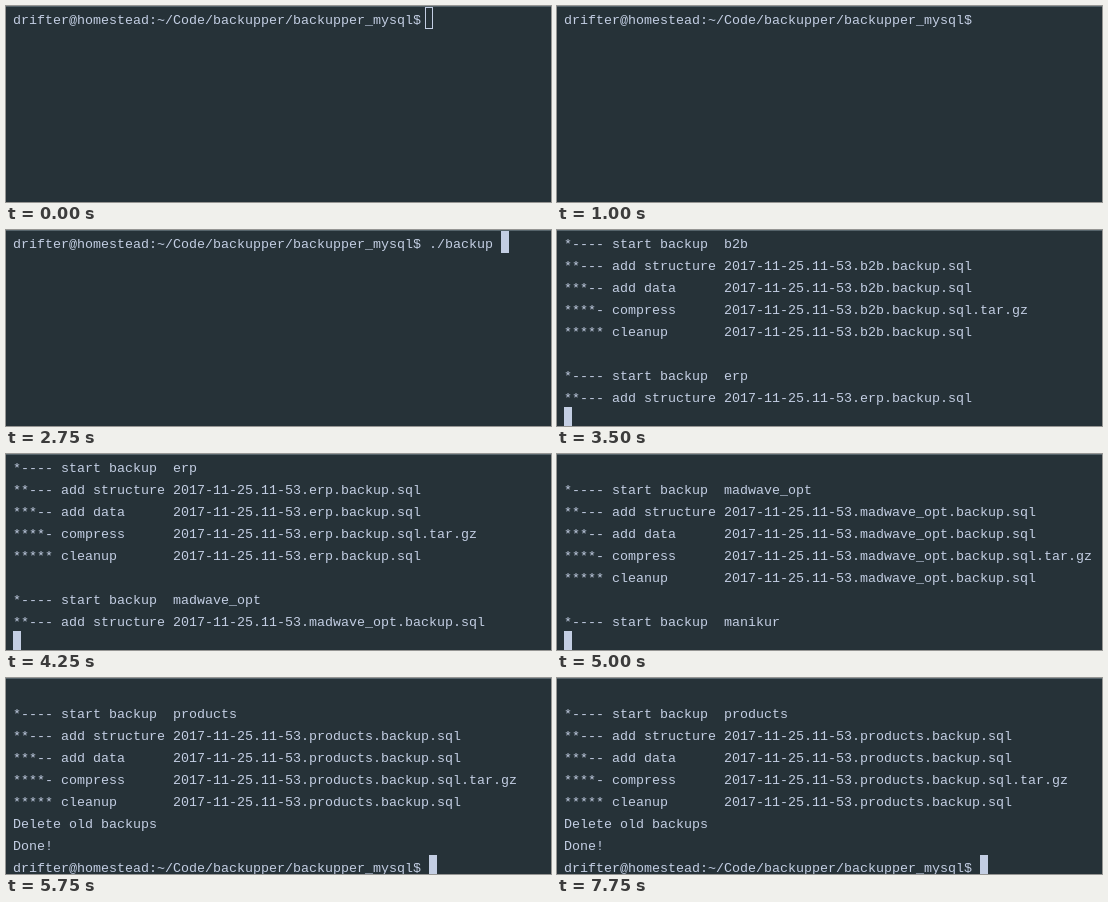
An HTML page that plays this animation: 545x196 px, repeating every 8000 ms.

```html
<!DOCTYPE html>
<html lang="en">
<head>
<meta charset="utf-8">
<title>Backup terminal</title>
<style>
  html, body {
    margin: 0;
    width: 100%;
    height: 100%;
    overflow: hidden;
    background: #263238;
  }
  #stage {
    position: relative;
    box-sizing: border-box;
    width: 100%;
    height: 100%;
    overflow: hidden;
    contain: strict;
    box-shadow: inset 0 1px #56646b;
  }
  #screen {
    position: absolute;
    left: 7px;
    top: 4px;
    margin: 0;
    color: #c3cee3;
    font: 13.3333px/22px "Liberation Mono", "Courier New", monospace;
    white-space: pre;
  }
  #cursor {
    position: absolute;
    box-sizing: border-box;
    width: 8px;
    height: 22px;
    border: 1px solid #c3cee3;
  }
  #cursor.hollow { margin-left: -4px; }
  #cursor.solid { background: #c3cee3; }
  #cursor.off { visibility: hidden; }
</style>
</head>
<body>
<div id="stage">
  <pre id="screen"></pre>
  <div id="cursor"></div>
</div>
<script>
  const LOOP = 8000, COL = 8, ROW = 22, LEFT = 7, TOP = 1;
  const PROMPT = 'drifter@homestead:~/Code/backupper/backupper_mysql$ ';
  const STAGES = ['start backup', 'add structure', 'add data', 'compress', 'cleanup'];

  function report(db) {
    const file = `2017-11-25.11-53.${db}.backup.sql`;
    const details = [db, file, file, file + '.tar.gz', file];
    return ['', ...STAGES.map((stage, i) =>
      '*'.repeat(i + 1).padEnd(5, '-') + ' ' + stage.padEnd(14) + details[i])];
  }

  const log = [
    PROMPT,
    ...['b2b', 'erp', 'madwave_opt', 'manikur', 'products'].flatMap(report),
    'Delete old backups',
    'Done!',
    PROMPT
  ];

  const typing = (at, text, cursor) => ({ at, lines: [PROMPT + text], cursor });
  const output = (at, first, cursor = 'solid') =>
    ({ at, lines: [...log.slice(first, first + 8), ''], cursor });
  const finished = (at, cursor) => ({ at, lines: log.slice(-9), cursor });

  const steps = [
    typing(0, '', 'hollow'),
    typing(750, '', 'solid'),
    typing(1000, '', 'off'),
    typing(1500, '.', 'off'),
    typing(1750, '.', 'solid'),
    typing(2000, './', 'solid'),
    typing(2500, './b', 'solid'),
    typing(2750, './backup ', 'solid'),
    output(3250, 1),
    output(3500, 2),
    output(4000, 2, 'off'),
    output(4250, 8),
    output(5000, 13),
    output(5250, 19),
    output(5500, 21),
    finished(5750, 'solid'),
    finished(6250, 'off'),
    finished(6750, 'solid'),
    finished(7250, 'off'),
    finished(7750, 'solid')
  ];

  const screenEl = document.getElementById('screen');
  const cursorEl = document.getElementById('cursor');
  const start = performance.now();
  let shown;

  function show({ lines, cursor }) {
    const row = lines.length - 1;
    screenEl.textContent = lines.join('\n');
    cursorEl.className = cursor;
    cursorEl.style.left = LEFT + lines[row].length * COL + 'px';
    cursorEl.style.top = TOP + row * ROW + 'px';
  }

  function tick() {
    const t = Math.max(0, performance.now() - start) % LOOP;
    const step = steps.findLast(s => s.at <= t);
    if (step !== shown) show(shown = step);
    requestAnimationFrame(tick);
  }
  tick();
</script>
</body>
</html>
```
